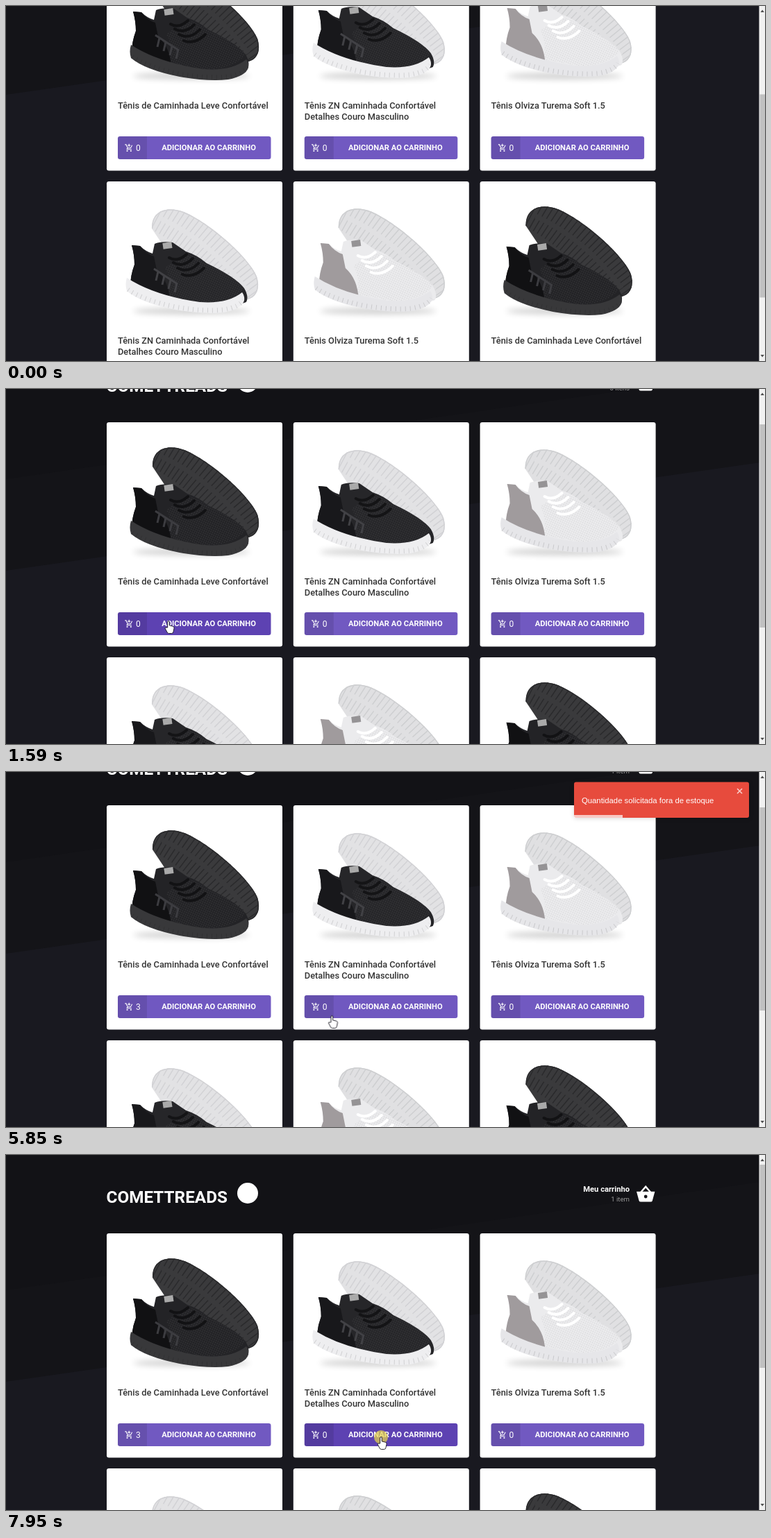
Animation of 1093x512 px, one loop 8000 ms. Source, as an HTML page:

```html
<!DOCTYPE html>
<html lang="pt-BR">
<head>
<meta charset="utf-8">
<title>Loja de tênis</title>
<style>
  @property --scroll { syntax: "<number>"; inherits: true; initial-value: 0; }

  html, body { margin: 0; width: 100%; height: 100%; overflow: hidden; background: #191920; }
  svg { display: block; width: 100%; height: 100%; font-family: Roboto, sans-serif; }
  #stage { animation: scroll 8s linear infinite; }
  #page { transform: translateY(calc(var(--scroll) * -1px)); }
  #thumb { transform: translateY(calc(var(--scroll) * .57px)); }

  .title { font-size: 12.8px; font-weight: 500; fill: #333; }
  .label { font-size: 11.2px; font-weight: 700; fill: #fff; text-anchor: middle; }
  .count { font-size: 12px; fill: #fff; }
  .items { font-size: 9.6px; fill: #999; text-anchor: end; }
  .icon { fill: none; stroke: #fff; stroke-width: 2; }
  .button { fill: #7159c1; }

  .hover0 { animation: hover0 8s linear infinite; }
  .hover1 { animation: hover1 8s linear infinite; }
  .zero, .one, .two, .three, .some, .arrow, .hand, .beam, .click { animation: 8s step-end infinite; }
  .zero { animation-name: zero; }
  .one { animation-name: one; }
  .two { animation-name: two; }
  .three { animation-name: three; }
  .some { animation-name: some; }
  .arrow { animation-name: arrow; }
  .hand { animation-name: hand; }
  .beam { animation-name: beam; }
  .click { animation-name: click; }
  #toast { animation: toast 8s cubic-bezier(.215, .61, .355, 1) infinite; }
  #toast text { font: 11.3px "Liberation Sans", Arial, sans-serif; fill: #fff; }
  #progress { transform-box: fill-box; transform-origin: left; animation: progress 8s linear infinite; }
  #cursor { animation: move 8s linear infinite; }

  @keyframes scroll {
    0%, 3% { --scroll: 199; animation-timing-function: ease-out; }
    7.375%, 8.1% { --scroll: 144; animation-timing-function: ease; }
    11.8%, 83.75% { --scroll: 65; animation-timing-function: ease; }
    86.5%, 100% { --scroll: 0; }
  }
  @keyframes hover0 {
    0%, 13.4%, 73.2%, 100% { fill: #7159c1; }
    16%, 71.1% { fill: #5d42b2; }
  }
  @keyframes hover1 {
    0%, 73%, 86.9%, 89.4%, 92.8%, 95% { fill: #7159c1; }
    75.5%, 84.6%, 97.5%, 100% { fill: #5d42b2; }
    90.6%, 91% { fill: #674cba; }
  }
  @keyframes zero { 0% { opacity: 1 } 26%, 100% { opacity: 0 } }
  @keyframes one { 0% { opacity: 0 } 26% { opacity: 1 } 30.98%, 100% { opacity: 0 } }
  @keyframes two { 0% { opacity: 0 } 30.98% { opacity: 1 } 38.72%, 100% { opacity: 0 } }
  @keyframes three { 0% { opacity: 0 } 38.72%, 100% { opacity: 1 } }
  @keyframes some { 0% { opacity: 0 } 26%, 100% { opacity: 1 } }
  @keyframes arrow {
    0%, 71.1%, 88.6%, 90.9% { opacity: 1 }
    13.2%, 72.8%, 89.5%, 95%, 100% { opacity: 0 }
  }
  @keyframes hand {
    0%, 71.1%, 84.2%, 90.9% { opacity: 0 }
    13.2%, 72.8%, 89.5%, 95%, 100% { opacity: 1 }
  }
  @keyframes beam { 0%, 88.6%, 100% { opacity: 0 } 84.2% { opacity: 1 } }
  @keyframes click {
    0%, 26%, 31.85%, 38.72%, 45.35% { opacity: 0 }
    24.2%, 30.1%, 36.85%, 43.72%, 99.3%, 100% { opacity: .72 }
  }
  @keyframes toast {
    0%, 45.375% { transform: translateX(3000px); opacity: 0; }
    50.625% { transform: translateX(-25px); opacity: 1; }
    51.94% { transform: translateX(10px); }
    53.25% { transform: translateX(-5px); }
    54.125%, 84.7% { transform: none; animation-timing-function: ease; }
    86.45% { transform: translateX(-20px); opacity: 1; animation-timing-function: ease; }
    93.45%, 100% { transform: translateX(2000px); opacity: 0; }
  }
  @keyframes progress {
    0%, 45.375% { transform: scaleX(1); }
    83.81%, 100% { transform: scaleX(0); }
  }
  @keyframes move {
    0%, 6.5% { transform: translate(-30px, 300px); }
    7.375% { transform: translate(-4px, 308px); }
    12.6% { transform: translate(205px, 345px); animation-timing-function: ease-out; }
    17.5%, 19.9% { transform: translate(234px, 335px); }
    22%, 69.4% { transform: translate(238px, 340px); }
    71.4% { transform: translate(343px, 357px); }
    73.125% { transform: translate(469px, 352px); animation-timing-function: ease-out; }
    76.25%, 86.8% { transform: translate(523px, 328px); }
    88.9% { transform: translate(540px, 372px); }
    89.75% { transform: translate(545px, 395px); }
    91.5% { transform: translate(566px, 436px); }
    93% { transform: translate(566px, 438px); animation-timing-function: ease-in-out; }
    96%, 100% { transform: translate(540px, 407px); }
  }
</style>
</head>
<body>
<svg id="stage" viewBox="0 0 1093 512">
  <defs>
    <pattern id="mesh" width="3" height="3" patternUnits="userSpaceOnUse" patternTransform="rotate(25)">
      <circle cx="1.5" cy="1.5" r=".7" fill="#888"/>
    </pattern>
    <filter id="soft" x="-20%" y="-100%" width="140%" height="300%"><feGaussianBlur stdDeviation="4"/></filter>
    <filter id="lift" x="-10%" y="-20%" width="120%" height="160%">
      <feDropShadow dx="0" dy="1" stdDeviation="3" flood-opacity=".15"/>
    </filter>
    <clipPath id="tread"><path d="M66 64C65 38 88 31 112 40C150 56 205 105 217 133C223 152 216 166 198 167L150 150 90 100Z"/></clipPath>
    <g id="cartIcon" class="icon">
      <path d="M1 3h3l4.3 9h8l4-7.500M8 12l-1.800 3.200q-.4 .8 .6 .8h12.200M12 1v8M8 5h8"/>
      <circle cx="7" cy="20" r="1"/><circle cx="17" cy="20" r="1"/>
    </g>
  </defs>

  <g id="page">
    <path fill="#191920" d="M0 0H1093V900H0z"/>
    <path fill="#141418" d="M0 0H1093V170L0 327z"/>
    <path fill="#121216" d="M0 0H1093V38L0 195z"/>
    <text x="144.500" y="68.500" font-size="24.300" font-weight="700" fill="#fff">COMETTREADS</text>
    <circle cx="348" cy="55" r="15" fill="#fff"/>
    <text x="898" y="53" font-size="11.200" font-weight="700" fill="#fff" text-anchor="end">Meu carrinho</text>
    <text class="items zero" x="898" y="67">0 itens</text>
    <text class="items some" x="898" y="67">1 item</text>
    <g transform="translate(906.800 42) scale(1.200)">
      <path class="icon" d="M6 10l6-7 6 7"/>
      <path fill="#fff" d="M1 9h22l-3 11q-.4 1.300-2 1.300H6q-1.600 0-2-1.300z"/>
      <circle cx="12" cy="15" r="2" fill="#141418"/>
    </g>
    <g id="cards"></g>
  </g>

  <g id="toast">
    <rect x="818" y="14.400" width="252" height="51.600" rx="3" fill="#e74c3c" filter="url(#lift)"/>
    <text x="829" y="44.500">Quantidade solicitada fora de estoque</text>
    <path d="M1053 24l7 7m0-7l-7 7" stroke="#fff" stroke-width="1.500" opacity=".75"/>
    <rect id="progress" x="818" y="62" width="252" height="4" fill="#fff" opacity=".7"/>
  </g>

  <g>
    <path fill="#f1f1f1" d="M1084.500 0h9v512h-9z"/>
    <rect id="thumb" x="1085.500" y="14" width="7.500" height="293" fill="#c1c1c1"/>
    <path fill="#505050" d="M1086.500 9l2.700-3.500 2.700 3.500zM1086.500 503l2.700 3.500 2.700-3.500z"/>
  </g>

  <g id="cursor">
    <circle class="click" r="10" fill="#e8d64a"/>
    <g fill="#fff" stroke="#15131c" stroke-width=".9" stroke-linejoin="round">
      <path class="arrow" d="M0 0V13l3-2.800 2 4.600 2-.9-2-4.500h4z"/>
      <path class="hand" d="M-1.300 9V1a1.300 1.300 0 0 1 2.600 0V6l5 1.200q2 .6 1.800 2.600l-1 5q-.4 2.700-2.600 2.700H.5q-1.500 0-2.300-1.500L-5 10q.6-2 2.200-.8z"/>
    </g>
    <path class="beam" fill="none" stroke="#333" d="M-3-6h2.500L0-5.500.500-6H3M0-5.500V5.500M-3 6h2.500L0 5.500.500 6H3"/>
  </g>
</svg>

<script>
  const black = {
    tread: '#3a3a3c', groove: '#2a2a2c', mid: '#38383a', heel: '#111113', upper: '#232326',
    lace: '#121214', tag: '#aaa', strap: '#3c3c40', soleAt: '0 0', shoeAt: '0 0', midAt: '0 0',
    title: ['Tênis de Caminhada Leve Confortável']
  };
  const duo = {
    tread: '#e2e2e4', groove: '#d2d2d5', mid: '#eeeef0', heel: '#18181b', upper: '#262629',
    lace: '#141416', tag: '#aaa', strap: '#414145', soleAt: '-1 4', shoeAt: '-2 -2', midAt: '-4 -1',
    title: ['Tênis ZN Caminhada Confortável', 'Detalhes Couro Masculino']
  };
  const white = {
    tread: '#e0e0e2', groove: '#cecfd1', mid: '#e6e6e9', heel: '#a09b9d', upper: '#ebebed',
    lace: '#fff', tag: '#959395', strap: 'none', soleAt: '-1 3', shoeAt: '1 -5', midAt: '-5 0',
    title: ['Tênis Olviza Turema Soft 1.5']
  };

  const shoe = c => `
    <ellipse cx="122" cy="187" rx="84" ry="5" fill="#000" opacity=".18" filter="url(#soft)"/>
    <g transform="translate(${c.soleAt})">
      <g clip-path="url(#tread)">
        <path d="M55 25H230V180H55z" fill="${c.tread}"/>
        <path d="M72 34Q150 72 214 164" fill="none" stroke="${c.groove}" stroke-width="62" stroke-dasharray="1.500 6"/>
        <path d="M80 50Q150 82 204 154" fill="none" stroke="${c.tread}" stroke-width="7"/>
        <path d="M66 64C65 38 88 31 112 40C150 56 205 105 217 133C223 152 216 166 198 167" fill="none" stroke="${c.groove}" stroke-width="3"/>
      </g>
    </g>
    <g transform="translate(${c.shoeAt})">
      <path d="M38 94L50 95Q58 103 68 106L71 92Q80 88 97 90L116 103Q132 108 146 120Q188 140 200 156Q207 168 203 176Q180 186 140 182Q80 176 36 154Q36 138 42 122Q42 108 38 94z" fill="${c.upper}"/>
      <path d="M86 126Q108 112 122 108Q136 114 146 120Q188 140 200 156Q180 180 140 177L90 168Q96 146 86 126z" fill="url(#mesh)" opacity=".25"/>
      <path d="M38 94L50 95Q58 106 70 110L74 130Q92 146 93 176Q60 172 36 154Q36 138 42 122Q42 108 38 94z" fill="${c.heel}"/>
      <path d="M70 128l34 22M76 132l-3 13M85 138l-3 13M94 144l-3 13M103 149l-3 13" fill="none" stroke="${c.strap}" stroke-width="3"/>
      <path d="M92 112q12 7 25-5M98 119q14 8 28-6M104 127q16 8 30-7M111 136q16 6 31-9" fill="none" stroke="${c.lace}" stroke-width="4" stroke-linecap="round"/>
      <rect x="83" y="90" width="13" height="9" fill="${c.tag}" transform="rotate(-8 89 95)"/>
      <g transform="translate(${c.midAt})">
        <path d="M35 142Q32 152 35 161Q55 178 105 188Q145 195 175 192Q200 187 204 175Q205 168 201 163Q180 180 140 177Q75 168 35 142z" fill="${c.mid}"/>
        <path d="M37 159Q58 174 105 184Q145 191 175 188Q197 184 203 174" fill="none" stroke="#000" stroke-width="7" stroke-dasharray="1 6" opacity=".13"/>
      </g>
    </g>`;

  const card = (c, i) => {
    const x = 145 + (i % 3) * 268.8, y = i < 3 ? 113 : 452;
    const counts = i ? '<tspan>0</tspan>' : '';
    const counter = i
      ? `<text class="count" x="42" y="294.600">${counts}</text>`
      : ['zero', 'one', 'two', 'three']
          .map((name, n) => `<text class="count ${name}" x="42" y="294.600">${n}</text>`).join('');
    return `<g transform="translate(${x} ${y})">
      <rect width="253" height="323.500" rx="3.200" fill="#fff"/>
      ${shoe(c)}
      ${c.title.map((line, n) => `<text class="title" x="16" y="${233.8 + n * 16}">${line}</text>`).join('')}
      <rect class="button ${i < 2 ? 'hover' + i : ''}" x="16" y="274" width="220.500" height="33" rx="3.200"/>
      <path d="M58 274v33H19.200q-3.200 0-3.200-3.200V277.200q0-3.200 3.200-3.200z" opacity=".1"/>
      <use href="#cartIcon" transform="translate(25.800 284.300) scale(.533)"/>
      ${counter}
      <text class="label" x="147" y="294.400">ADICIONAR AO CARRINHO</text>
    </g>`;
  };

  document.getElementById('cards').innerHTML =
    [black, duo, white, duo, white, black].map(card).join('');
</script>
</body>
</html>
```
